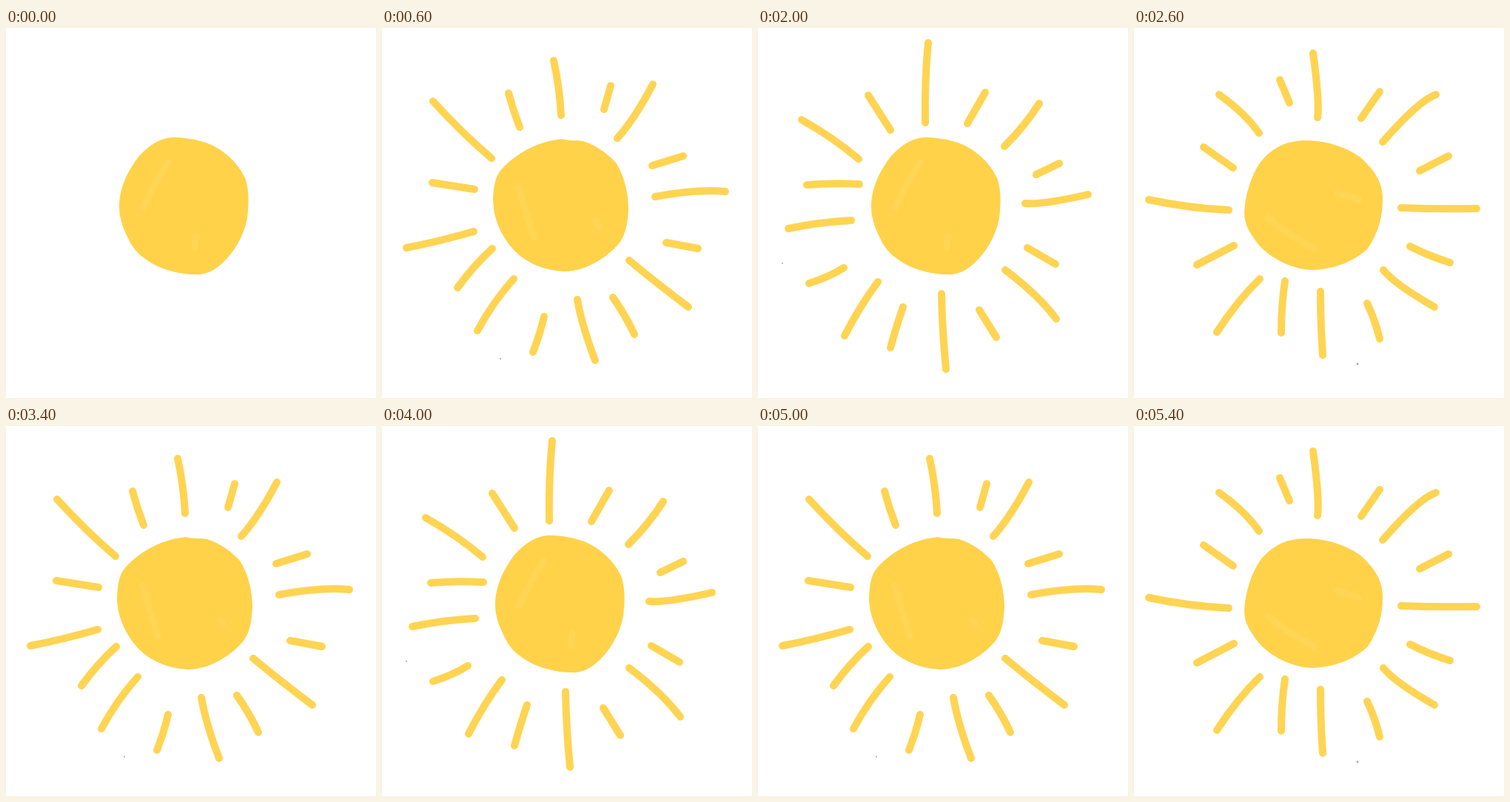
An HTML page for the animation above (5610 ms loop, 500 px wide and 500 px high).

```html
<!DOCTYPE html>
<html lang="en">
<head>
<meta charset="utf-8">
<title>Sun</title>
<style>
html, body { margin: 0; width: 100%; height: 100%; overflow: hidden; background: #fff; }
svg { display: block; width: 100vw; height: 100vh; }
.disc { fill: #ffd24a; }
.rays, .shine { fill: none; stroke: #ffd452; stroke-width: 10; stroke-linecap: round; }
.shine { stroke: #ffd555; stroke-width: 9; }
.speck { fill: #aaa; }
</style>
</head>
<body>
<svg id="stage" viewBox="0 0 500 500"></svg>
<script>
const LOOP = 5610, STEP = 200, LAST = 27;

const poses = {
  tall: {
    disc: 'M222 148C240 147 258 151 273 156C298 166 317 187 324 205C329 222 328 240 326 257C321 282 308 304 291 319C280 329 268 334 255 333C235 333 216 327 203 321C187 313 175 303 168 290C159 273 153 258 153 242C153 216 165 192 180 173C191 161 205 150 222 148Z',
    shine: 'M219 182Q201 209 185 243M257 281L255 297',
    rays: `M230 20Q225 70 226 128 M149 91L179 138 M59 124Q103 149 136 177
      M66 212Q100 209 137 211 M41 271Q85 262 126 260 M69 345Q95 337 116 324
      M162 343Q138 375 117 416 M196 377Q188 400 179 432 M248 359Q249 410 254 461
      M299 381L322 418 M334 327Q378 360 403 393 M364 297L402 319
      M361 237Q385 239 446 225 M376 198L407 183 M333 160Q361 132 380 102
      M307 87L283 129`,
    speck: [33, 318, 1]
  },
  tilted: {
    disc: 'M243 150C255 153 261 151 272 153C291 159 306 171 316 182C328 200 333 225 333 245C332 262 330 277 322 289C309 306 278 329 246 329C222 328 197 319 180 302C162 283 150 258 150 231C151 213 153 203 159 194C174 176 203 154 243 150Z',
    shine: 'M185 216Q193 246 205 283M289 262L294 268',
    rays: `M232 44Q240 80 242 118 M171 88Q177 111 186 134 M69 99Q107 141 148 176
      M68 209L125 218 M33 297Q75 289 124 275 M149 298Q123 322 102 351
      M178 339Q150 370 129 409 M219 390Q214 412 204 438 M264 367Q270 402 288 449
      M312 364Q329 388 341 414 M334 314Q370 344 414 377 M384 290L427 298
      M369 228Q428 217 464 221 M365 186L407 173 M318 149Q342 122 366 76
      M309 78L300 110`,
    speck: [160, 447, 1]
  },
  wide: {
    disc: 'M237 152C262 153 284 160 305 174C322 189 337 207 336 232C336 254 331 275 316 298C297 316 270 326 241 327C216 326 192 315 173 298C158 281 149 266 149 250C150 227 158 199 171 181C183 166 199 156 214 154C222 152 230 152 237 152Z',
    shine: 'M181 257Q210 281 243 298M275 222L304 232',
    rays: `M242 34Q251 100 248 121 M197 70L210 101 M115 90Q150 115 169 142
      M94 161L134 189 M20 232Q77 244 128 246 M85 320L135 294
      M170 339Q140 368 112 411 M204 342Q199 375 199 412 M252 356Q252 400 255 442
      M315 372Q326 395 332 420 M337 327Q352 346 406 377 M373 295Q398 308 427 317
      M361 243Q410 245 463 244 M386 193L425 173 M336 154Q385 98 408 90
      M332 86L307 122`,
    speck: [302, 454, 1.4]
  }
};

const stage = document.getElementById('stage');

function add(parent, tag, attrs) {
  const node = document.createElementNS('http://www.w3.org/2000/svg', tag);
  for (const key in attrs) node.setAttribute(key, attrs[key]);
  return parent.appendChild(node);
}

for (const pose of Object.values(poses)) {
  pose.group = add(stage, 'g', {});
  add(pose.group, 'path', { class: 'disc', d: pose.disc });
  add(pose.group, 'path', { class: 'shine', d: pose.shine });
  pose.outer = add(pose.group, 'g', {});
  add(pose.outer, 'path', { class: 'rays', d: pose.rays });
  const [cx, cy, r] = pose.speck;
  add(pose.outer, 'circle', { class: 'speck', cx, cy, r });
}

// Each round of 14 steps opens on the bare disc, then the poses sway.
const sway = ['tall', 'wide', 'tall', 'tilted'];

function draw(time) {
  const step = Math.min(LAST, Math.floor(time % LOOP / STEP)) % 14;
  const current = poses[sway[step % 4]];
  for (const pose of Object.values(poses)) {
    pose.group.style.display = pose === current ? '' : 'none';
  }
  current.outer.style.display = step === 0 ? 'none' : '';
}

const start = performance.now();
function tick() {
  draw(performance.now() - start);
  requestAnimationFrame(tick);
}
tick();
</script>
</body>
</html>
```
